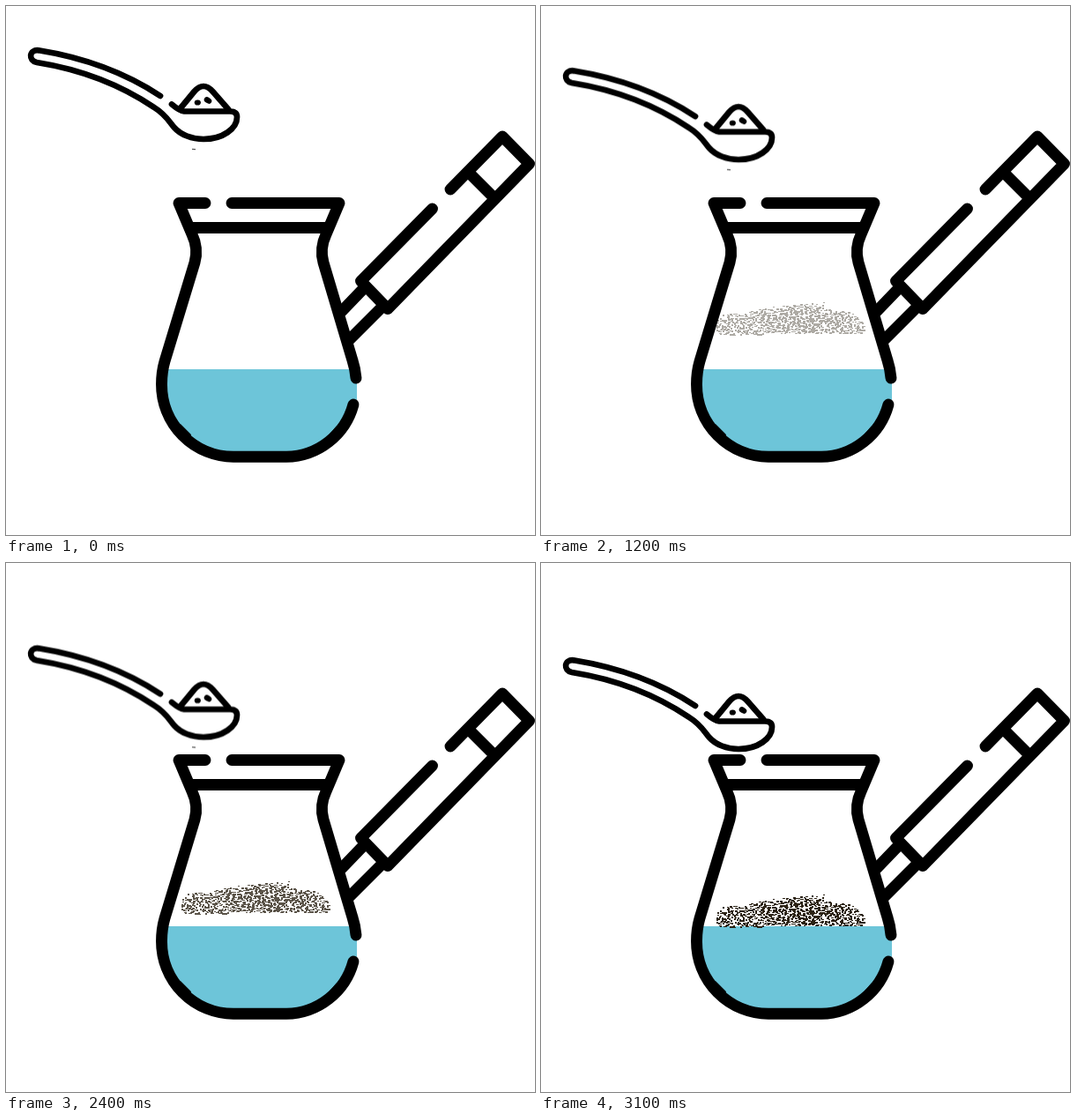
Write an HTML page with a canvas that moves like this. It is 600 px wide and 600 px high and loops after 4.1 s.

```html
<!DOCTYPE html>
<html lang="en">
<head>
<meta charset="utf-8">
<title>Coffee pot</title>
<style>
  html, body { margin: 0; width: 100%; height: 100%; overflow: hidden; background: #fff; }
  svg, canvas { position: absolute; left: 0; top: 0; }
  .ink { fill: none; stroke: #000; stroke-linecap: round; stroke-linejoin: round; }
  #powder {
    left: 198px; top: 375px;
    image-rendering: pixelated;
    animation: settle 4100ms infinite;
  }
  .spoon { animation: lower 4100ms infinite; }
  /* 31 steps of 100 ms, then a one second hold */
  @keyframes lower {
    0% { transform: translateY(0); animation-timing-function: steps(31, end); }
    75.6097%, 100% { transform: translateY(60px); }
  }
  @keyframes settle {
    0% { transform: translateY(-66px); opacity: 0; animation-timing-function: steps(31, end); }
    75.6097%, 100% { transform: translateY(0); opacity: 1; }
  }
</style>
</head>
<body>
<svg width="600" height="600" viewBox="0 0 600 600">
  <path fill="#6dc5d9" d="M178 412H398V446L394 452A82 82 0 0 1 318 511H258A82 82 0 0 1 176 429Z"/>
  <path class="spoon" d="M211 162.300L215 162.700" stroke="#555" stroke-width="1.200"/>
</svg>
<canvas id="powder" width="172" height="40"></canvas>
<svg width="600" height="600" viewBox="0 0 600 600">
  <g class="ink" stroke-width="12.900">
    <path d="M226 223.500H196L211 259Q218.500 275 214 291L180 403Q176.500 415 176.500 429A82 82 0 0 0 258 511.300H318A80 80 0 0 0 394 452"/>
    <path d="M256 223.500H378L363 259Q355.500 275 360 291L393 402Q396 411 397 422"/>
    <path d="M212 251.500H362"/>
    <path d="M483.500 230L402.500 312L433 343.500L593.500 179L563 148L504 208M526 190L552 216"/>
    <path d="M381 346L406 320M389 379L426 342"/>
  </g>
  <path class="ink" stroke-width="4" d="M197 476L208 487M369 486L376 478"/>
  <g class="spoon">
    <g class="ink" stroke-width="6.700">
      <path d="M175 102Q116 63 37 50.300C26 49 25 62 35 64Q110 76 168 115C181 123 185 131 191 138C198 146 211 151 224 151C246 151 262 139 262 126Q262 119.500 254 119.500H202Q197 119 188 111.500"/>
      <path d="M197 117L213.500 97Q224 85 234.500 97L252 117"/>
    </g>
    <ellipse cx="217.300" cy="109.500" rx="3.600" ry="3.100"/>
    <ellipse cx="229" cy="107" rx="4.600" ry="3.300" transform="rotate(30 229 107)"/>
  </g>
</svg>
<script>
  const ctx = document.getElementById('powder').getContext('2d');
  let seed = 11;
  const rand = () => (seed = (seed * 16807) % 2147483647) / 2147483647;

  // upper outline of the heap as [x, y]
  const crest = [[0, 22], [8, 15], [32, 12], [46, 8], [72, 5], [100, 2],
                 [122, 1], [126, 8], [148, 11], [162, 16], [171, 28]];
  const topAt = x => {
    const i = Math.max(1, crest.findIndex(p => p[0] >= x));
    const [x0, y0] = crest[i - 1], [x1, y1] = crest[i];
    return y0 + (y1 - y0) * (x - x0) / (x1 - x0);
  };

  ctx.fillStyle = '#2b2214';
  for (let row = 0; row < 39; row += 2) {
    for (let col = (row % 4) - 1; col < 171; col += 3) {
      const x = Math.max(1, Math.floor(col + rand() * 3));
      const y = Math.floor(row + rand() * 2);
      const depth = y - topAt(Math.min(x, 170));
      const floor = x < 58 ? 39 : 37;
      const core = Math.exp(-(((x - 88) / 45) ** 2));
      const keep = Math.min(0.85 + 0.15 * core, 0.6 + depth * 0.06);
      const w = rand() < 0.3 + 0.4 * core ? 3 : 2;
      const h = rand() < 0.55 ? 2 : 1;
      if (depth >= 0 && y + h <= floor && x + w <= 171 && rand() < keep) {
        ctx.fillRect(x, y, w, h);
      }
    }
  }
</script>
</body>
</html>
```
